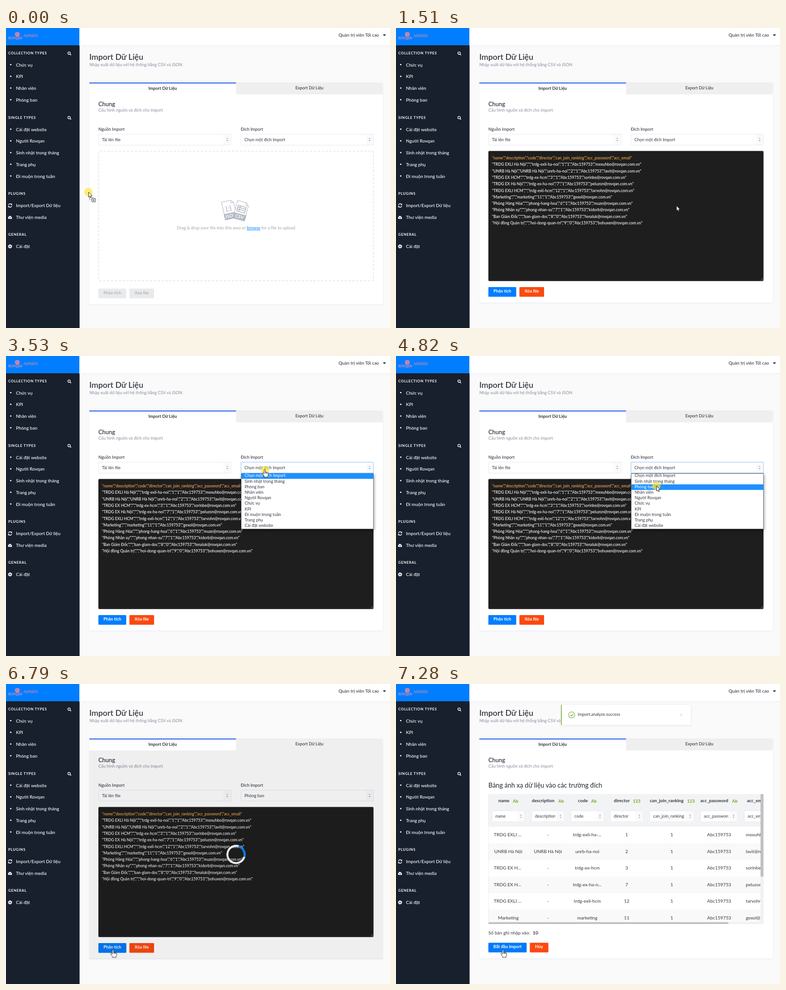
Animation, 848 px wide and 660 px high, one loop 8000 ms. Source, as an HTML page:

```html
<!DOCTYPE html>
<html lang="vi">
<head>
<meta charset="utf-8">
<title>Import Dữ Liệu</title>
<style>
html, body { margin: 0; width: 100%; height: 100%; overflow: hidden; }
#stage { display: block; width: 848px; height: 660px; font: 9.35px Lato, "Open Sans", sans-serif; fill: #333740; background: #fafafb; }
.card { filter: drop-shadow(0 1.4px 1.5px #e3e9f3); }
.menu-box { filter: drop-shadow(1px 3px 3px #0006); }
.toast-box { filter: drop-shadow(0 1px 2px #dfe3ea); }

.upload, .drag, .code, .form, .pick, .picked, .focus, .menu, .hi0, .hi1, .hi2, .hover, .busy, .table,
.halo, .badge, .arrow, .hand { animation: 8s step-end infinite; }
.upload { animation-name: upload; }
.drag { animation-name: drag; }
.code { animation-name: code; }
.form { animation-name: form; }
.pick { animation-name: pick; }
.picked { animation-name: picked; }
.focus { animation-name: focus; }
.menu { animation-name: menu; }
.hi0 { animation-name: hi0; }
.hi1 { animation-name: hi1; }
.hi2 { animation-name: hi2; }
.hover { animation-name: hover; }
.busy { animation-name: busy; }
.table { animation-name: table; }
.halo { animation-name: halo; }
.badge { animation-name: badge; }
.arrow { animation-name: arrow; }
.hand { animation-name: hand; }
.toast { animation: toast 8s linear infinite; }
.spin { animation: spin 2s -1.55s linear infinite; }
.cursor { animation: move 8s linear infinite; }

@keyframes upload { 0% { opacity: 1 } 18.875%, to { opacity: 0 } }
@keyframes drag { 0% { opacity: 0 } 1.9% { opacity: 1 } 18.875%, to { opacity: 0 } }
@keyframes code { 0% { opacity: 0 } 18.875% { opacity: 1 } 85.75%, to { opacity: 0 } }
@keyframes form { 0% { opacity: 1 } 85.75%, to { opacity: 0 } }
@keyframes pick { 0% { opacity: 1 } 61.875%, to { opacity: 0 } }
@keyframes picked { 0% { opacity: 0 } 61.875%, to { opacity: 1 } }
@keyframes focus { 0% { opacity: 0 } 43.25% { opacity: 1 } 77.25%, to { opacity: 0 } }
@keyframes menu { 0% { opacity: 0 } 44.125% { opacity: 1 } 61.875%, to { opacity: 0 } }
@keyframes hi0 { 0% { opacity: 1 } 52.625%, to { opacity: 0 } }
@keyframes hi1 { 0% { opacity: 0 } 52.625% { opacity: 1 } 56%, to { opacity: 0 } }
@keyframes hi2 { 0% { opacity: 0 } 56%, to { opacity: 1 } }
@keyframes hover { 0% { opacity: 0 } 73%, to { opacity: 1 } }
@keyframes busy { 0% { opacity: 0 } 80.625% { opacity: 1 } 85.75%, to { opacity: 0 } }
@keyframes table { 0% { opacity: 0 } 85.75%, to { opacity: 1 } }
@keyframes toast { 0%, 86.8% { opacity: 0 } 91%, to { opacity: 1 } }
@keyframes halo {
  0% { opacity: 1 } 15.5% { opacity: 0 }
  43.25% { opacity: 1 } 45.75% { opacity: 0 }
  60.25% { opacity: 1 } 62.75% { opacity: 0 }
  77.25% { opacity: 1 } 79.75%, to { opacity: 0 }
}
@keyframes badge { 0% { opacity: 1 } 17%, to { opacity: 0 } }
@keyframes hand { 0% { opacity: 0 } 42.5% { opacity: 1 } 49.875% { opacity: 0 } 71.5%, to { opacity: 1 } }
@keyframes arrow { 0% { opacity: 1 } 42.5% { opacity: 0 } 49.875% { opacity: 1 } 71.5%, to { opacity: 0 } }
@keyframes spin { to { transform: rotate(360deg) } }
@keyframes move {
  0%, .9% { transform: translate(182px, 361px); animation-timing-function: cubic-bezier(.3, .1, .4, 1) }
  6.125%, 36.5% { transform: translate(619px, 391px); animation-timing-function: ease-in-out }
  42.375%, 52% { transform: translate(572px, 251px) }
  53.5%, 55.5% { transform: translate(575px, 280px) }
  56.875%, 66.2% { transform: translate(575px, 286px); animation-timing-function: cubic-bezier(.4, .1, .5, 1) }
  69.5% { transform: translate(264px, 605px); animation-timing-function: ease-in-out }
  75.6%, to { transform: translate(237px, 586px) }
}
</style>
</head>
<body>
<svg id="stage" viewBox="0 0 848 660"></svg>
<script>
const BLUE = '#007eff', RED = '#fb4a10', GREEN = '#6ea81e', GREY = '#868d9c';

const text = (x, y, s, attrs = '') => `<text x="${x}" y="${y}" ${attrs}>${s}</text>`;
const mid = (x, y, s, attrs = '') => text(x, y, s, 'text-anchor="middle" ' + attrs);
const rect = (x, y, w, h, fill, attrs = '') =>
  `<rect x="${x}" y="${y}" width="${w}" height="${h}" fill="${fill}" ${attrs}/>`;
const line = (d, color, w = 1, attrs = '') =>
  `<path d="${d}" fill="none" stroke="${color}" stroke-width="${w}" ${attrs}/>`;
const group = (name, ...parts) => `<g class="${name}">${parts.join('')}</g>`;

const card = bottom => rect(184, 120, 648, bottom - 120, '#fff', 'class="card" rx="1.5"');
const button = (x, y, w, s, fill, color = '#fff') =>
  rect(x, y, w, 21.3, fill, 'rx="1.5"') + mid(x + w / 2, y + 12.2, s, `font-size="9.4" font-weight="700" fill="${color}"`);
const carets = (x, y) => `<path d="M${x - 2} ${y - 1.6}l2-2.4 2 2.4zM${x - 2} ${y + 1.6}l2 2.4 2-2.4z" fill="#9aa1ae"/>`;
const select = (x, y, w, s) =>
  rect(x + .5, y + .5, w - 1, 24, '#fff', 'stroke="#e3e9f3" rx="1.5"') +
  rect(x + w - 17, y + 1, 16, 23, '#fafafb') + carets(x + w - 9, y + 12.5) +
  `<svg x="${x + 8}" y="${y}" width="${w - 29}" height="25">${text(0, 15.5, s)}</svg>`;

const pen = document.createElement('canvas').getContext('2d');
pen.font = '10.2px Lato, "Open Sans", sans-serif';

// Centred text, or left-aligned with an ellipsis when wider than max.
function cell(x, y, s, max = 64) {
  const width = str => pen.measureText(str).width;
  if (width(s) <= max) return mid(x, y, s, 'font-size="10.2"');
  while (width(s + '...') > max) s = s.slice(0, -1);
  return text(x - max / 2, y, s + '...', 'font-size="10.2"');
}

function sidebar() {
  const heading = (y, s) => text(5, y + 3, s, 'font-size="7.9" font-weight="700" letter-spacing=".717" fill="#fff"');
  const item = (y, s) => text(22, y + 3.5, s, 'font-size="10.04" font-weight="500" fill="#fff"');
  const bullets = (y, names) => names.map((s, i) =>
    `<circle cx="10.5" cy="${y - .5 + i * 25.75}" r="1.6" fill="#fff"/>` + item(y + i * 25.75, s)).join('');
  const search = y => `<circle cx="139.3" cy="${y - .7}" r="2.7" fill="none" stroke="#fff" stroke-width="1.3"/>` +
    line(`M141.3 ${y + 1.3}l2.4 2.4`, '#fff', 1.5);
  return rect(0, 0, 162.5, 660, '#18202e') + rect(0, 0, 162.5, 38, BLUE) +
    '<circle cx="25" cy="14" r="5.5" fill="#bd84b4"/>' +
    text(5, 25, 'ROVQAN', 'font-size="7" font-weight="900" fill="#b48cc0"') +
    text(38, 20, 'ADMIN', 'font-size="9.2" font-weight="700" font-family="Liberation Serif, serif" fill="#c088b0"') +
    heading(55, 'COLLECTION TYPES') + search(56) +
    bullets(81, ['Chức vụ', 'KPI', 'Nhân viên', 'Phòng ban']) +
    heading(197, 'SINGLE TYPES') + search(197.7) +
    bullets(223, ['Cài đặt website', 'Người Rovqan', 'Sinh nhật trong tháng', 'Trang phụ', 'Đi muộn trong tuần']) +
    heading(364, 'PLUGINS') + item(390, 'Import/Export Dữ liệu') + item(416, 'Thư viện media') +
    line('M5.3 389.7A3.8 3.8 0 0 1 12 388M12.7 391.3A3.8 3.8 0 0 1 6 393', '#fff', 1.4) +
    '<path d="M13.4 386v3.6H9.8zM4.6 395v-3.6h3.6z" fill="#fff"/>' +
    '<path d="M6.2 420a2.2 2.2 0 0 1-.5-4.2 2.9 2.9 0 0 1 5.5-1 2 2 0 0 1 1.4 2.3 1.6 1.6 0 0 1-.4 2.9z" fill="#fff"/>' +
    line('M9 419v-2.6m-1.4 1l1.4-1.4 1.4 1.4', '#18202e', .9) +
    heading(454, 'GENERAL') + item(480, 'Cài đặt') +
    '<circle cx="9" cy="480.5" r="2.5" fill="none" stroke="#fff" stroke-width="2"/>' +
    '<circle cx="9" cy="480.5" r="3.9" fill="none" stroke="#fff" stroke-width="1.4" stroke-dasharray="1.6 1.463"/>';
}

function header() {
  return rect(162, 38, 686, 1.5, '#eef0f4') + rect(162, 0, 686, 38, '#fff') +
    text(734.5, 19, 'Quản trị viên Tối cao', 'font-size="9.9" font-weight="500"') +
    '<path d="M832 14h7.4l-3.7 4z" fill="#333740"/>' +
    text(184, 70, 'Import Dữ Liệu', 'font-size="17.8" font-weight="600"') +
    text(184, 84, 'Nhập xuất dữ liệu với hệ thống bằng CSV và JSON', `fill="${GREY}"`);
}

function tabs() {
  return rect(184, 120, 324, 26, '#fff') + rect(184, 120, 324, 2, '#1c5de7') + rect(508, 120, 324, 26, '#efefef') +
    mid(346, 136, 'Import Dữ Liệu', 'font-size="9.35" font-weight="700"') +
    mid(670, 135, 'Export Dữ Liệu', 'font-weight="500"') +
    text(204, 172, 'Chung', 'font-size="12.9" font-weight="600"') +
    text(204, 184, 'Cấu hình nguồn và đích cho import', `fill="${GREY}"`);
}

function fileIcon() {
  const page = (x, y, turn, label, body) =>
    `<g transform="translate(${x} ${y}) rotate(${turn})">
      <path d="M-13-20H7l6 6V20H-13z" fill="#fff" stroke="#bcc1cb" stroke-width="1.3"/>
      <path d="M7-20v6h6" fill="none" stroke="#bcc1cb"/>${body}
      ${rect(-14, 7, 28, 13, '#b3b8c3')}${mid(0, 17, label, 'font-size="10" font-weight="700" fill="#fff"')}</g>`;
  return page(493, 400, -13, 'JSON', mid(-1, 2, '{;}', 'font-size="15" fill="#9fa6b3"')) +
    page(519, 402, 15, 'CSV', line('M-9-10H9V3H-9zM-9-6H9M-9-1.7H9M-4-10V3', '#aab0bc', 1.4));
}

function upload() {
  const zone = (stroke, fill) => rect(204.7, 271, 606.6, 285, fill, `stroke="${stroke}" stroke-width="1.5" stroke-dasharray="5 3.6" rx="2"`);
  return group('upload', card(608), zone('#dfe3ec', '#fff'),
    group('drag', zone('#d5e2fb', '#fdfeff')), fileIcon(),
    mid(508, 443, `Drag &amp; drop your file into this area or <tspan fill="${BLUE}" text-decoration="underline">browse</tspan> for a file to upload`, 'fill="#a0a6b1"'),
    button(204, 573.3, 61.5, 'Phân tích', '#e9eaeb', '#b4b6ba'), button(272.5, 573.3, 54.5, 'Xóa file', '#e9eaeb', '#b4b6ba'));
}

const columns = ['name', 'description', 'code', 'director', 'can_join_ranking', 'acc_password', 'acc_email'];
const records = [
  ['TRDG EXLI Hà Nội', '', 'trdg-exli-ha-noi', 1, 1, 'mexuhbo'],
  ['UNRB Hà Nội', 'UNRB Hà Nội', 'unrb-ha-noi', 2, 1, 'lavit'],
  ['TRDG EX HCM', '', 'trdg-ex-hcm', 3, 1, 'sorinbe'],
  ['TRDG EX Hà Nội', '', 'trdg-ex-ha-noi', 7, 1, 'peluzon'],
  ['TRDG EXLI HCM', '', 'trdg-exli-hcm', 12, 1, 'tarvohn'],
  ['Marketing', '', 'marketing', 11, 1, 'gexol'],
  ['Phòng Hàng Hóa', '', 'phong-hang-hoa', 6, 1, 'muze'],
  ['Phòng Nhân sự', '', 'phong-nhan-su', 7, 1, 'kidorb'],
  ['Ban Giám Đốc', '', 'ban-giam-doc', 8, 0, 'fenaluk'],
  ['Hội đồng Quản trị', '', 'hoi-dong-quan-tri', 9, 0, 'bohuxen']
].map(r => [...r.slice(0, 5), 'Abc159753', r[5] + '@rovqan.com.vn']);

function code() {
  const lines = [columns, ...records].map((r, i) =>
    text(212, 289 + i * 14.3, r.map(v => `"${v}"`).join(','), `font-size="8.65" font-weight="500" fill="${i ? '#fff' : '#ffb04d'}"`));
  return group('code', card(604), rect(204, 270.5, 607.6, 286.3, '#1e1e1e', 'rx="2.5"'), ...lines,
    line('M805.5 555.5l5-5M808.5 555.5l2-2', '#aaa', .8),
    button(204, 570, 61.5, 'Phân tích', BLUE),
    group('hover', button(204, 570, 61.5, 'Phân tích', '#007af7')),
    button(272.5, 570, 54.5, 'Xóa file', RED));
}

function form() {
  return group('form',
    text(204, 225.5, 'Nguồn Import', 'font-size="9.4" font-weight="500"'),
    text(518.5, 225.5, 'Đích Import', 'font-size="9.4" font-weight="500"'),
    select(204, 233, 293.5, 'Tải lên file'),
    group('pick', select(518.5, 233, 293.5, 'Chọn một đích Import')),
    group('picked', select(518.5, 233, 293.5, 'Phòng ban')),
    group('focus', rect(519, 233.5, 292.5, 24, 'none', 'stroke="#8fc3f8" rx="1.5"')));
}

function menu() {
  const names = ['Chọn một đích Import', 'Sinh nhật trong tháng', 'Phòng ban', 'Nhân viên', 'Người Rovqan',
    'Chức vụ', 'KPI', 'Đi muộn trong tuần', 'Trang phụ', 'Cài đặt website'];
  const top = i => 258 + i * 12.2;
  const label = (i, attrs) => text(527, top(i) + 8.4, names[i], attrs);
  const active = i => group('hi' + i, rect(520, top(i), 291.5, 12.2, '#1e90ff'), label(i, 'fill="#fff" font-weight="500"'));
  return group('menu', rect(519.5, 258.5, 292, 122, '#fff', 'class="menu-box" stroke="#6b6b6b"'),
    ...names.map((_, i) => label(i, '')), active(0), active(1), active(2));
}

function busy() {
  return group('busy', rect(184, 146, 648, 459, '#000', 'fill-opacity=".062"'),
    `<g transform="translate(508 375)"><g class="spin" fill="none" stroke-width="4.2">
      <circle r="19" stroke="#f3f3f3"/><path d="M-13.4-13.4A19 19 0 0 1 13.4-13.4" stroke="${BLUE}"/></g></g>`);
}

function table() {
  // label x, type x, type, select x, select width, cell centre
  const layout = [
    [226, 258, 'Ab', 211.5, 73.5, 248], [300, 358.5, 'Ab', 299, 73.5, 335.5], [402, 431, 'Ab', 386, 73.5, 422.5],
    [481, 523, '123', 473, 73.5, 509.5], [560.5, 643, '123', 560, 98.5, 609],
    [672, 742, 'Ab', 672, 82.5, 713.5], [775, 830, 'Ab', 768.5, 82, 804.5]
  ];
  const head = layout.map(([x, tx, type, sx, w], i) =>
    text(x, 260, columns[i], 'font-size="10" font-weight="700"') +
    text(tx, 260.5, type, `font-size="9.6" font-weight="700" fill="${GREEN}"`) + select(sx, 278.5, w, columns[i]));
  const rows = records.slice(0, 6).map((r, i) =>
    rect(204, 314 + i * 36.5, 601, 36.5, i % 2 ? '#f9f9f9' : '#fff') +
    r.map((v, col) => cell(layout[col][5], 335 + i * 36.5, String(v) || '-')).join(''));
  return group('table', card(603.5),
    text(204, 227.5, 'Bảng ánh xạ dữ liệu vào các trường đích', 'font-size="14.35" font-weight="500"'),
    '<svg x="204" y="242" width="601" height="282" viewBox="204 242 601 282">',
    rect(204, 242, 601, 72, '#f2f3f4', 'rx="2"'), ...head, ...rows, '</svg>',
    line('M204.3 242v282', '#e6e8ec', .7),
    rect(805, 242, 6.5, 286, '#f1f1f1'), rect(204, 524, 601, 4, '#f1f1f1'),
    rect(805, 242, 6.5, 182, '#c1c1c1', 'rx="2"'), rect(204, 524, 530, 4, '#c1c1c1', 'rx="1.5"'),
    text(204, 551, 'Số bản ghi nhập vào:', 'font-size="10.2"'), text(302, 551, '10', 'font-size="10.2" font-weight="700"'),
    button(204, 569.2, 84.5, 'Bắt đầu import', '#007af7'), button(295.5, 569.2, 41, 'Hủy', RED));
}

function toast() {
  return group('toast', rect(364.6, 46, 286.4, 44, '#fff', 'class="toast-box" rx="1.5"'), rect(364.6, 46, 1.5, 44, GREEN),
    `<circle cx="388" cy="68" r="6.8" fill="none" stroke="${GREEN}" stroke-width="1.1"/>`,
    line('M385 68.2l2.2 2.2 4-4.4', GREEN, 1.4),
    text(401.5, 70.3, 'import.analyze.success', 'font-size="9.4"'),
    line('M627 65.5l5.4 5.4m0-5.4l-5.4 5.4', '#c9ccd2', .9));
}

function cursor() {
  const shape = (name, d, extra = '') =>
    `<g class="${name}"><path d="${d}" fill="#fff" stroke="#111" stroke-width=".9" stroke-linejoin="round"/>${extra}</g>`;
  return group('cursor', '<circle class="halo" r="9.2" fill="#ffe632" fill-opacity=".68"/>',
    group('badge', rect(2.5, 11.5, 8, 5, '#fff', 'stroke="#222" stroke-width=".8" stroke-dasharray="1.2 1"'),
      rect(7.8, 14, 7.4, 7.4, '#fff', 'stroke="#222" stroke-width=".9"'), line('M9.5 17.7h4M11.5 15.7v4', '#222', .9)),
    shape('arrow', 'M.4 0V11.2L3 8.8 4.7 12.8 6.4 12 4.8 8.2H8.4z'),
    '<g transform="translate(-.8 -1.6)">',
    shape('hand', 'M-1.4 1.3a1.4 1.4 0 0 1 2.8 0V6l5.2 1.2q1.8.5 1.7 2.3-.2 3-1.7 5.5V17H-1V15.2L-4.6 10q-.8-1.4.3-2t2 .6l.9 1.2z',
      line('M1.4 6v3M3.6 6.6v2.8M5.8 7.2v2.6', '#111', .8)),
    '</g>');
}

document.getElementById('stage').innerHTML =
  [sidebar, header, upload, code, table, tabs, form, busy, menu, toast, cursor].map(draw => draw()).join('');
</script>
</body>
</html>
```
